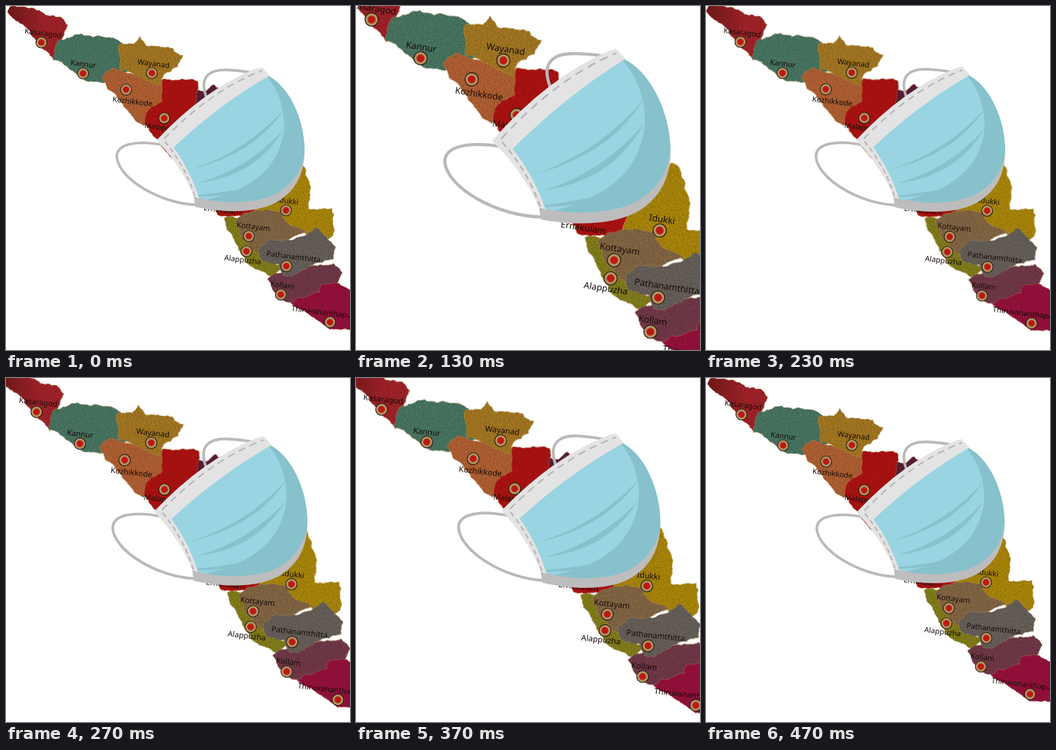
Write an HTML page that moves like this. It is 500 px wide and 500 px high and loops after 1.51 s.

```html
<!DOCTYPE html>
<html lang="en">
<head>
<meta charset="utf-8">
<title>Masked map</title>
<style>
  html, body { margin: 0; width: 100%; height: 100%; overflow: hidden; background: #fff; }
  svg { display: block; width: 100vw; height: 100vh; }
  text { font: 10.8px "Noto Sans", "Open Sans", sans-serif; fill: #160c08; text-anchor: middle; }
</style>
</head>
<body>
<svg viewBox="0 0 500 500">
  <defs>
    <filter id="paper" filterUnits="userSpaceOnUse" x="-10" y="-10" width="540" height="500" color-interpolation-filters="sRGB">
      <feTurbulence type="fractalNoise" baseFrequency="0.5" numOctaves="2" seed="4"/>
      <feColorMatrix values="0 0 0 0 0  0 0 0 0 0  0 0 0 0 0  0.4 0 0 0 -0.11"/>
      <feComposite in2="SourceAlpha" operator="in" result="grain"/>
      <feMerge><feMergeNode in="SourceGraphic"/><feMergeNode in="grain"/></feMerge>
    </filter>
    <linearGradient id="shade">
      <stop offset="0" stop-color="#781a1c"/>
      <stop offset="0.6" stop-color="#a8242b"/>
    </linearGradient>
  </defs>

  <g id="map">
    <g id="regions" filter="url(#paper)" stroke="#cda45c" stroke-opacity="0.55" stroke-width="0.7" stroke-linejoin="round"></g>
    <g id="markers"></g>
    <g id="labels"></g>
  </g>

  <g id="mask" fill="none">
    <g stroke="#b9b9b9" stroke-width="3.8">
      <path d="M291 132C281 104 294 91 324 93Q344 94 362 98"/>
      <path d="M228 202C190 195 161 200 161 219C163 250 222 287 277 289"/>
    </g>
    <path fill="#99d4e2" d="M236 200Q300 140 376 99C411 113 434 165 434 210C432 245 414 270 384 280Q330 294 278 282Q268 245 236 200Z"/>
    <g fill="#87c1cb">
      <path d="M376 99C398 122 408 158 403 188C394 230 368 264 290 282Q340 294 384 280C414 270 432 245 434 210C434 165 411 113 376 99Z"/>
      <path d="M270 237Q350 211 404 150Q362 215 270 237Z"/>
      <path d="M279 257Q350 238 403 180Q362 248 279 257Z"/>
      <path d="M280 275Q325 270 368 261Q328 277 280 277Z"/>
    </g>
    <path fill="#bdbdbd" d="M273 277C310 288 352 288 384 277C410 266 428 245 434 215C432 250 418 268 400 281C372 301 322 302 275 292Z"/>
    <path fill="#e3e3e3" d="M219 195L233 192Q266 232 281 280L273 277Q256 235 219 195Z"/>
    <path fill="#e3e3e3" d="M219 195Q288 121 363 91L372 89L383 101Q307 145 242 207Z"/>
    <g stroke="#b5b5b5" stroke-width="2">
      <path stroke-dasharray="10 7" d="M230 193Q300 121 372 94"/>
      <path stroke-dasharray="7 5" d="M231 197Q263 236 275 279"/>
    </g>
  </g>
</svg>
<script>
const $ = id => document.getElementById(id);

function add(parent, tag, attrs, content = "") {
  const node = document.createElementNS("http://www.w3.org/2000/svg", tag);
  for (const name in attrs) node.setAttribute(name, attrs[name]);
  node.textContent = content;
  $(parent).append(node);
}

// Repeatable noise from a position, in -0.5..0.5.
function noise(x, y) {
  const v = Math.sin(x * 12.9898 + y * 78.233) * 43758.5453;
  return v - Math.floor(v) - 0.5;
}

// Midpoint displacement turns a straight side into a torn edge.
function torn([ax, ay], [bx, by]) {
  const length = Math.hypot(bx - ax, by - ay);
  if (length < 3.5) return [[ax, ay]];
  const mx = (ax + bx) / 2, my = (ay + by) / 2;
  const amount = Math.min(length, 18) * 0.26;
  const mid = [mx + noise(mx, my) * amount, my + noise(my, mx) * amount];
  return [...torn([ax, ay], mid), ...torn(mid, [bx, by])];
}

// Later regions overlap earlier ones, so hidden borders need few corners.
function region(fill, corners) {
  const points = corners.split(" ").map(p => p.split(",").map(Number));
  const edge = points.flatMap((p, i) => torn(p, points[(i + 1) % points.length]));
  add("regions", "path", { fill, d: "M" + edge.map(p => p.map(v => v.toFixed(1))).join("L") + "Z" });
}

const ABOVE = -10, BELOW = 18;

function label(name, x, y) {
  add("labels", "text", { transform: `translate(${x} ${y}) rotate(7)` }, name);
}

function town(name, cx, cy, shift = 2, side = ABOVE) {
  add("markers", "circle", { cx, cy, r: 8, fill: "#b59765", stroke: "#2a1a12", "stroke-width": 1.1 });
  add("markers", "circle", { cx, cy, r: 4.6, fill: "#c01712", stroke: "#9a4a2a", "stroke-width": 0.6 });
  label(name, cx + shift, cy + side);
}

const RED = "#b51313";
region("#5e2038", "270,146 278,122 290,124 302,114 312,120 340,200 260,190");
region("#8a8a20", "236,214 300,205 300,262 275,265");
region("url(#shade)", "2,8 8,0 40,3 57,13 80,16 90,28 80,50 70,80 36,42");
region("#4c7b67", "76,50 102,41 152,46 172,58 180,95 142,112 108,104 84,85 68,76");
region("#b86435", "139,104 155,90 230,110 230,150 200,174 182,158 147,120");
region("#ab7d24", "164,56 186,55 194,44 204,58 242,61 258,72 250,88 232,98 226,116 165,92");
region(RED, "228,106 278,109 270,200 242,222 202,172 206,152 227,138");
region(RED, "285,265 400,250 364,290 362,300 345,307 308,304");
region("#88831c", "317,308 340,308 372,360 402,380 386,393 352,375 334,345");
region("#b18c0a", "418,215 426,218 440,254 440,295 474,294 475,334 466,340 400,315 362,296 370,270");
region("#896b47", "340,306 362,297 400,298 412,318 440,328 366,360 342,338 333,312");
region("#763b4b", "380,397 404,385 476,374 489,388 470,430 418,432 396,424 387,412");
region("#6b645d", "368,350 380,341 424,336 450,322 479,350 476,368 440,378 416,393 403,392 396,375 370,368");
region("#9d123f", "424,424 456,416 458,405 484,403 508,424 506,474 470,470 426,440 414,432");

town("Kasaragod", 51.5, 53);
town("Kannur", 112, 98, 0);
town("Wayanad", 212, 97.5);
town("Kozhikkode", 174.5, 121.5, 9, BELOW + 3);
town("Malappuram", 230, 163, 3, BELOW);
town("Idukki", 407, 297);
town("Kottayam", 353, 334.5, 6);
town("Alappuzha", 349.5, 356.5, -6, BELOW - 2);
town("Pathanamthitta", 407.5, 378, 10);
town("Kollam", 399.5, 419.5);
town("Thiruvananthapuram", 471, 459.5, -3);
label("Ernakulam", 314, 300);

const LOOP = 1510, STEP = 100 / 3, PULSE = 225;

function pose(id, cx, cy, scale, angle) {
  $(id).setAttribute("transform",
    `translate(${cx} ${cy}) rotate(${angle}) scale(${scale}) translate(${-cx} ${-cy})`);
}

// Two linear pulses at 30 steps a second, then a rest.
function draw(ms) {
  const tick = Math.floor((ms % LOOP) / 10) * 10;
  const time = Math.floor((tick + 4) / STEP) * STEP;
  const pulse = Math.floor(time / PULSE);
  const phase = (time % PULSE) / PULSE;
  const [grow, turn] = [[0.25, 2.15], [0.1, -1.1]][pulse] || [0, 0];
  const amount = 1 - Math.abs(2 * phase - 1);
  pose("map", 217.5, 187, 1 + grow * amount, turn * amount);
  pose("mask", 320, 209.5, 1 + grow * amount, -turn * amount);
}

const start = performance.now();
function frame() {
  draw(performance.now() - start);
  requestAnimationFrame(frame);
}
frame();
</script>
</body>
</html>
```
